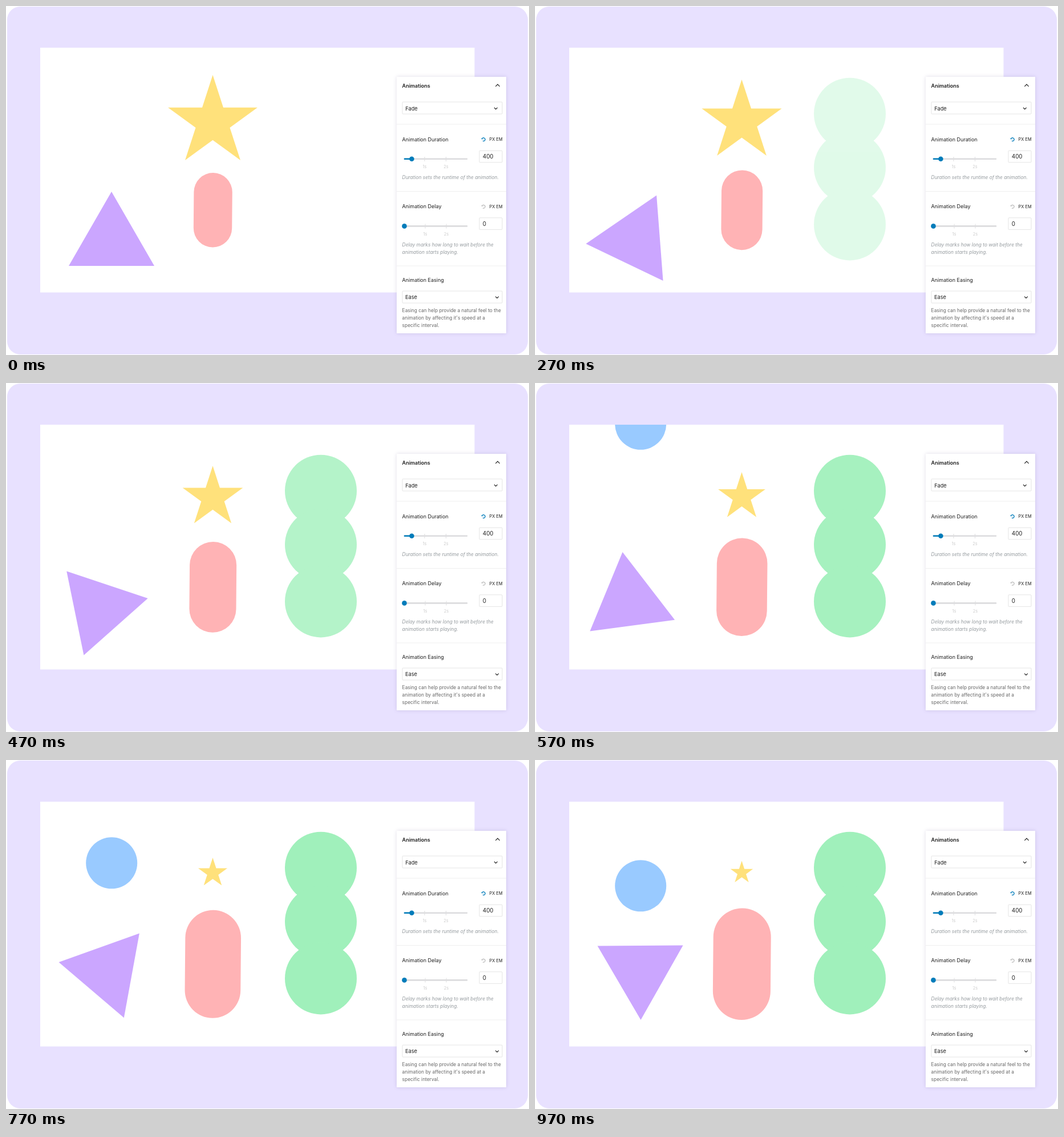
These frames come from a looping animation (917x611 px, 1.01 s). An HTML page:

```html
<!DOCTYPE html>
<html lang="en">
<head>
<meta charset="utf-8">
<title>Shape animations</title>
<style>
  html, body { margin: 0; width: 100%; height: 100%; overflow: hidden; background: #fff; }
  svg { display: block; width: 917px; height: 611px; }
  text { font-family: Inter, "Open Sans", sans-serif; font-size: 9px; fill: #1e1e1e; }
  .title { font-weight: 600; }
  .value { font-size: 9.2px; }
  .number { font-size: 9.8px; }
  .unit { font-size: 7.4px; }
  .mark { font-size: 7.4px; fill: #ccc; text-anchor: middle; }
  .note { font-size: 8.4px; fill: #666; }
  .hint { font-size: 8.4px; fill: #949a9e; font-style: italic; }
  .box { fill: #fff; stroke: #e4e4e4; }
  .line { stroke: #efefef; }
  .chevron { fill: none; stroke: #1e1e1e; stroke-width: 1.2; }
  .track { stroke: #dcdcde; stroke-width: 2.6; stroke-linecap: round; }
  .tick { stroke: #dcdcde; }
  .fill { stroke: #007cba; stroke-width: 2.6; stroke-linecap: round; }
  .thumb { fill: #007cba; }
  .panel { fill: #fff; filter: drop-shadow(0 0 3px rgba(60, 40, 110, .16)); }
</style>
</head>
<body>
<svg viewBox="0 0 917 611">
  <defs>
    <clipPath id="canvas"><rect x="60" y="73" width="761.5" height="428.5"/></clipPath>
    <g id="reset" fill="none" stroke="currentColor" stroke-width="1.2">
      <path d="M-2.2 -1.7A2.8 2.8 0 1 1 -1.4 2.5"/>
      <path d="M-3.6 -2.9V-.4H-1Z" fill="currentColor" stroke="none"/>
    </g>
  </defs>

  <rect x="2" y="1" width="913" height="609" rx="23" fill="#e8e1ff"/>
  <rect x="60" y="73" width="761.5" height="428.5" fill="#fff"/>

  <g clip-path="url(#canvas)">
    <circle id="ball" cx="185.2" r="45" fill="#99caff"/>
    <path id="triangle" d="M0 -65L75 65H-75Z" fill="#cba6ff"/>
    <path id="star" fill="#ffe17b"/>
    <rect id="pill" x="-33.7" y="-65.2" width="67.4" height="130.4" rx="33.7" fill="#ffb3b5"/>
    <g id="stack" fill="#a0f0bb">
      <circle cx="552" cy="188.7" r="63"/>
      <circle cx="552" cy="283" r="63"/>
      <circle cx="552" cy="382.4" r="63"/>
    </g>
  </g>

  <rect class="panel" x="685" y="124" width="192" height="449"/>
  <path class="line" d="M685 207H877M685 324.5H877M685 455H877"/>

  <text class="title" x="694.6" y="143">Animations</text>
  <path class="chevron" d="M858.4 140.8L862 137.2L865.6 140.8"/>
  <rect class="box" x="695" y="168" width="175" height="21" rx="1"/>
  <text class="value" x="700.3" y="182.6">Fade</text>
  <path class="chevron" d="M856 177.9L858.8 180.7L861.6 177.9"/>

  <text x="694.6" y="237">Animation Duration</text>
  <use href="#reset" x="837.3" y="233.6" color="#007cba"/>
  <text class="unit" x="847.5" y="236.2">PX</text>
  <text class="unit" x="859.6" y="236.2">EM</text>
  <path class="track" d="M699 267.8H808"/>
  <path class="tick" d="M734 264V272M771.5 264V272"/>
  <path class="fill" d="M699 267.8H711"/>
  <circle class="thumb" cx="711.4" cy="267.8" r="4.3"/>
  <text class="mark" x="734" y="284.3">1s</text>
  <text class="mark" x="771.5" y="284.3">2s</text>
  <rect class="box" x="830" y="253.3" width="40" height="20.5" rx="1"/>
  <text class="number" x="835.8" y="267.4">400</text>
  <text class="hint" x="694.6" y="303">Duration sets the runtime of the animation.</text>

  <text x="694.6" y="354.3">Animation Delay</text>
  <use href="#reset" x="837.3" y="351.2" color="#bbb"/>
  <text class="unit" x="847.5" y="353.8">PX</text>
  <text class="unit" x="859.6" y="353.8">EM</text>
  <path class="track" d="M699 385.4H808"/>
  <path class="tick" d="M735 381.5V389.5M772 381.5V389.5"/>
  <circle class="thumb" cx="698.5" cy="385.4" r="4.3"/>
  <text class="mark" x="735" y="401.9">1s</text>
  <text class="mark" x="772" y="401.9">2s</text>
  <rect class="box" x="830" y="370.8" width="40" height="20.5" rx="1"/>
  <text class="number" x="835.8" y="384.9">0</text>
  <text class="hint" x="694.6" y="420.6">Delay marks how long to wait before the</text>
  <text class="hint" x="694.6" y="433.5">animation starts playing.</text>

  <text x="694.6" y="483">Animation Easing</text>
  <rect class="box" x="695" y="499" width="175" height="21" rx="1"/>
  <text class="value" x="700" y="513">Ease</text>
  <path class="chevron" d="M858.2 508.6L861 511.4L863.8 508.6"/>
  <text class="note" x="694.6" y="536.3">Easing can help provide a natural feel to the</text>
  <text class="note" x="694.6" y="549.2">animation by affecting it's speed at a</text>
  <text class="note" x="694.6" y="562.1">specific interval.</text>
</svg>

<script>
const LOOP = 1010, STEPS = 30;
const get = id => document.getElementById(id);
const [ball, triangle, star, pill, stack] =
  ['ball', 'triangle', 'star', 'pill', 'stack'].map(get);

// Power ease-in-out; the exponent of the second half can differ.
const ease = (x, out = 2) =>
  x < .5 ? 2 * x * x : 1 - .5 * (2 - 2 * Math.min(x, 1)) ** out;

function starPath(r) {
  const points = Array.from({ length: 10 }, (_, i) => {
    const a = i * Math.PI / 5, d = i % 2 ? r * .382 : r;
    return `${(d * Math.sin(a)).toFixed(2)} ${(r * .0955 - d * Math.cos(a)).toFixed(2)}`;
  });
  return `M${points.join('L')}Z`;
}

const place = (el, x, y, rest) =>
  el.setAttribute('transform', `translate(${x} ${y}) ${rest}`);

function draw(step) {
  const x = step / STEPS;
  const p = ease(x, 2.1);
  place(triangle, 185, 390, `rotate(${180 * ease(x)})`);
  place(star, 362.5, 195.3, `scale(${1 - .75 * p})`);
  place(pill, 362.8, 357.3, `scale(${1 + .5 * p}) rotate(.5)`);
  ball.setAttribute('cy', 221 - 403 * (1 - p));
  stack.setAttribute('opacity', ease((step + .5) / 21.5));
}

// Thirty pictures a second, on a 10 ms clock.
function tick() {
  const t = performance.now() % LOOP;
  draw(Math.min(STEPS - 1, Math.floor((3 * Math.floor(t / 10) + 1) / 10)));
  requestAnimationFrame(tick);
}

star.setAttribute('d', starPath(82.5));
tick();
</script>
</body>
</html>
```
